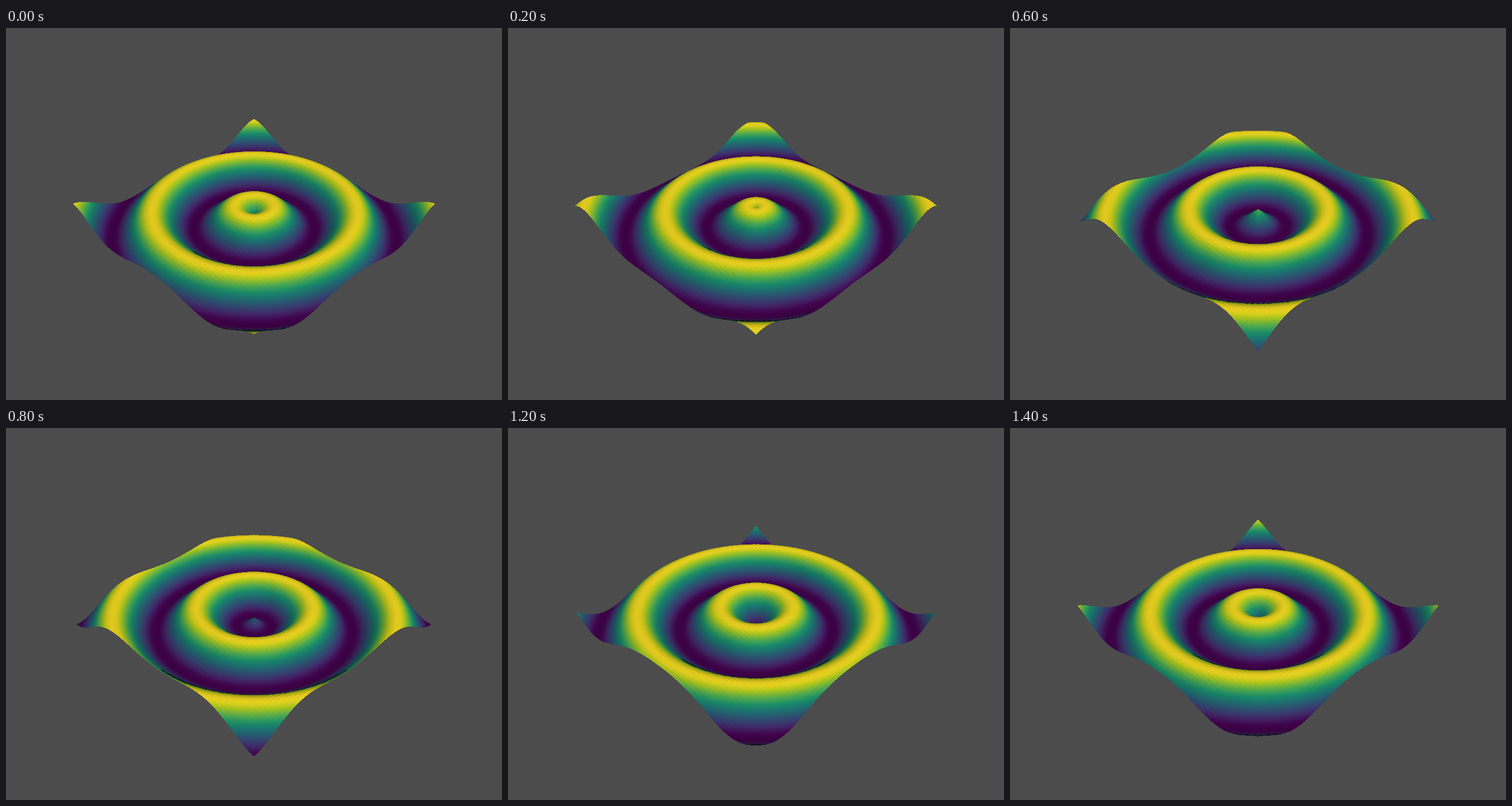
An HTML page with a canvas that plays this animation: 864x648 px, repeating every 1.5 s.

```html
<!DOCTYPE html>
<html lang="en">
<head>
<meta charset="utf-8">
<title>Ripple surface</title>
<style>
  html, body { margin: 0; width: 100%; height: 100%; overflow: hidden; background: #4c4c4c; }
  canvas { display: block; width: 864px; height: 648px; }
</style>
</head>
<body>
<canvas id="stage" width="864" height="648"></canvas>
<script>
const W = 864, H = 648, STEPS = 15, STEP_MS = 100;
const N = 80, CELL = 0.25, START = -10, MID = -0.125;
const RAD = Math.PI / 180;

const ctx = document.getElementById('stage').getContext('2d');
const image = ctx.createImageData(W, H);
const pixels = image.data;
const depth = new Float32Array(W * H);

// Camera on the (1, 1, 1) axis, 30 degree view, fitted to the bounding sphere
const HALF = (N - 1) * CELL / 2;
const DIST = Math.hypot(HALF, HALF, 1) / Math.sin(15 * RAD);
const ZOOM = H / 2 / Math.tan(15 * RAD);

// Colour ramp, smoothly interpolated between stops
const stops = ['440154', '482475', '414487', '355f8d', '2a788e', '21918c',
  '22a884', '44bf70', '7ad151', 'bddf26', 'fde725']
  .map(h => [0, 2, 4].map(i => parseInt(h.slice(i, i + 2), 16)));

function ramp(v) {
  const last = stops.length - 1;
  const i = Math.min(Math.floor(v * last), last - 1), f = v * last - i;
  const at = k => stops[Math.max(0, Math.min(last, k))];
  return [0, 1, 2].map(c => {
    const [a, b, d, e] = [i - 1, i, i + 1, i + 2].map(k => at(k)[c]);
    return b + f / 2 * (d - a + f * (2 * a - 5 * b + 4 * d - e + f * (3 * (b - d) + e - a)));
  });
}
const lut = new Float32Array(256 * 3);
for (let i = 0; i < 256; i++) lut.set(ramp(i / 255), i * 3);

// Lights in view space: elevation, azimuth, intensity, tint
function light(elev, azim, power, tint) {
  const e = elev * RAD, a = azim * RAD;
  return {
    dir: [Math.cos(e) * Math.sin(a), Math.sin(e), Math.cos(e) * Math.cos(a)],
    rgb: tint.map(c => c * power)
  };
}
const white = [1, 1, 1];
const lights = [
  light(50, 10, 0.75, [1, 0.9724, 0.9021]),
  light(-75, 0, 0.25, [0.9086, 0.9382, 1]),
  light(0, 0, 0.25, white),
  light(0, 110, 0.75 / 3.5, white),
  light(0, -110, 0.75 / 3.5, white)
];

function shade(a, b, c) {
  const ux = b.x - a.x, uy = b.y - a.y, uz = b.z - a.z;
  const vx = c.x - a.x, vy = c.y - a.y, vz = c.z - a.z;
  let nx = uy * vz - uz * vy, ny = uz * vx - ux * vz, nz = ux * vy - uy * vx;
  const s = (nz < 0 ? -1 : 1) / Math.hypot(nx, ny, nz);
  nx *= s; ny *= s; nz *= s;
  let r = 0, g = 0, bl = 0;
  for (const { dir, rgb } of lights) {
    const d = Math.max(0, nx * dir[0] + ny * dir[1] + nz * dir[2]);
    r += d * rgb[0]; g += d * rgb[1]; bl += d * rgb[2];
  }
  return [r, g, bl];
}

function vertex(i, j, phase) {
  const wx = START + i * CELL, wy = START + j * CELL;
  const h = Math.sin(Math.hypot(wx, wy) + phase);
  const px = wx - MID, py = wy - MID;
  const x = (py - px) / Math.SQRT2;
  const y = (2 * h - px - py) / Math.sqrt(6);
  const z = (px + py + h) / Math.sqrt(3);
  const k = 1 / (DIST - z);
  return { x, y, z, k, sx: W / 2 + x * k * ZOOM, sy: H / 2 - y * k * ZOOM, v: (h + 1) / 2 };
}

function triangle(a, b, c) {
  const area = (b.sx - a.sx) * (c.sy - a.sy) - (b.sy - a.sy) * (c.sx - a.sx);
  if (!area) return;
  const [lr, lg, lb] = shade(a, b, c);
  const x0 = Math.ceil(Math.min(a.sx, b.sx, c.sx) - 0.5);
  const x1 = Math.floor(Math.max(a.sx, b.sx, c.sx) - 0.5);
  const y0 = Math.ceil(Math.min(a.sy, b.sy, c.sy) - 0.5);
  const y1 = Math.floor(Math.max(a.sy, b.sy, c.sy) - 0.5);
  for (let y = y0; y <= y1; y++) {
    for (let x = x0; x <= x1; x++) {
      const dx = x + 0.5 - a.sx, dy = y + 0.5 - a.sy;
      const wb = (dx * (c.sy - a.sy) - dy * (c.sx - a.sx)) / area;
      const wc = (dy * (b.sx - a.sx) - dx * (b.sy - a.sy)) / area;
      const wa = 1 - wb - wc;
      if (wa < -1e-9 || wb < -1e-9 || wc < -1e-9) continue;
      const k = wa * a.k + wb * b.k + wc * c.k, at = y * W + x;
      if (k <= depth[at]) continue;
      depth[at] = k;
      const v = wa * a.v + wb * b.v + wc * c.v;
      const l = 3 * Math.max(0, Math.min(255, Math.floor(v * 256))), p = at * 4;
      pixels[p] = lut[l] * lr;
      pixels[p + 1] = lut[l + 1] * lg;
      pixels[p + 2] = lut[l + 2] * lb;
    }
  }
}

function draw(step) {
  const phase = 2 * Math.PI * step / STEPS;
  depth.fill(0);
  new Uint32Array(pixels.buffer).fill(0xff4c4c4c);
  const grid = [];
  for (let i = 0; i < N; i++)
    for (let j = 0; j < N; j++) grid.push(vertex(i, j, phase));
  for (let i = 0; i < N - 1; i++) {
    for (let j = 0; j < N - 1; j++) {
      const n = i * N + j;
      const a = grid[n], b = grid[n + N], c = grid[n + N + 1], d = grid[n + 1];
      triangle(a, b, c);
      triangle(a, c, d);
    }
  }
  ctx.putImageData(image, 0, 0);
}

const begin = performance.now();
let shown = 0;
function tick() {
  const step = Math.floor((performance.now() - begin) / STEP_MS) % STEPS;
  if (step !== shown) draw(shown = step);
  requestAnimationFrame(tick);
}
draw(0);
requestAnimationFrame(tick);
</script>
</body>
</html>
```
